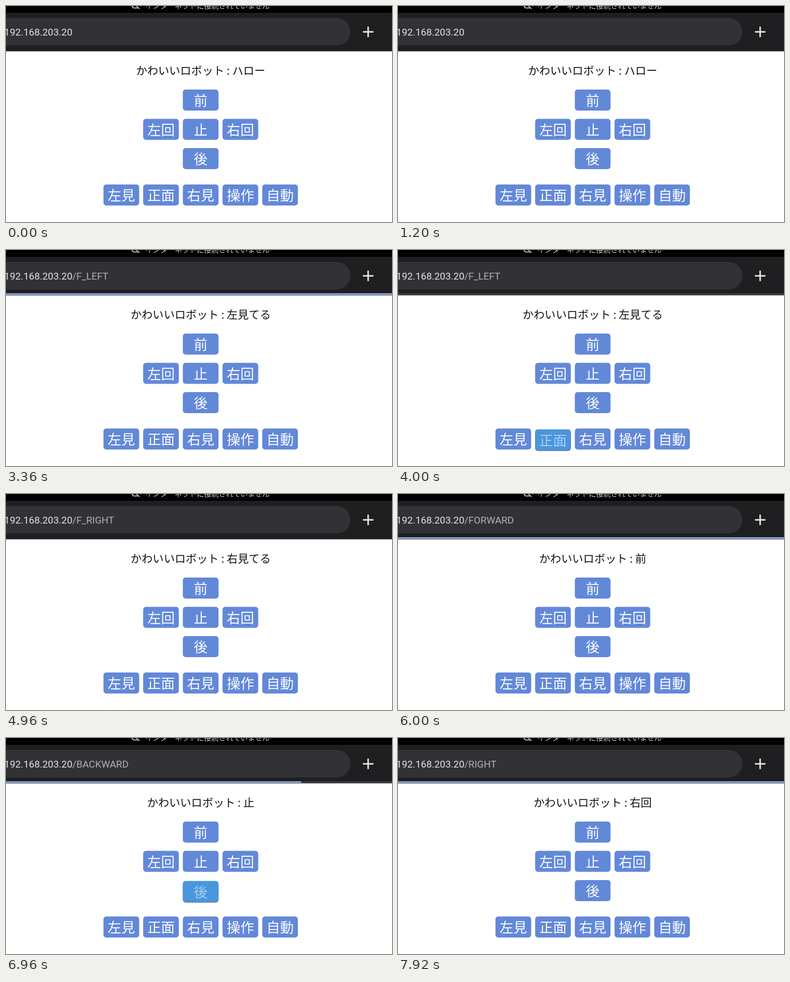
These frames come from a looping animation (676x380 px, 8 s). An HTML page:

```html
<!DOCTYPE html>
<html lang="ja">
<head>
<meta charset="utf-8">
<style>
html, body { margin: 0; width: 100%; height: 100%; overflow: hidden; background: #fff; }
svg { display: block; }
text { font-family: "Noto Sans CJK JP", "Noto Sans CJK", sans-serif; }
.url { font: 17.1px Roboto, sans-serif; }
.button rect { fill: #6288d8; }
.button text { font-size: 24px; fill: #fff; text-anchor: middle; }
.button .edge { fill: none; }
.pressed { transform: translateY(1.4px); }
.pressed .face { fill: #4a96dc; }
.pressed .edge { fill: #5a5f92; }
.pressed text { fill: #a8d0f2; }
</style>
</head>
<body>
<svg width="676" height="380" viewBox="0 0 676 380">
  <rect width="676" height="79.7" fill="#1f1f21"/>
  <rect width="676" height="12" fill="#000"/>
  <path d="M223 -4a4 4 0 0 0 1 7.5h7M221 -6l13 11" fill="none" stroke="#ccc" stroke-width="1.5"/>
  <text x="244" y="4.2" font-size="12.85" fill="#ccc">インターネットに接続されていません</text>
  <rect x="-60" y="21" width="663" height="48.5" rx="24" fill="#323236"/>
  <text class="url" x="116.3" y="52" text-anchor="end" fill="#e6e6e8">192.168.203.20</text>
  <text class="url" id="path" x="116.3" y="52" fill="#b2b2b6"></text>
  <path d="M625 45.5h18.5M634.2 36.2v18.5" stroke="#eee" stroke-width="2.5"/>
  <rect id="track" y="76.3" width="676" height="2.6" fill="#3d3e43"/>
  <rect id="bar" y="76.3" height="2.4" fill="#9ab8f2"/>
  <text id="title" x="341" y="120.5" font-size="19.3" fill="#111" text-anchor="middle"></text>
  <g id="pad"></g>
</svg>
<script>
const LOOP = 8000, STEP = 80;
const $ = id => document.getElementById(id);

// label, column, top
const layout = [
  ['前', 2, 147], ['左回', 1, 198.5], ['止', 2, 198.5], ['右回', 3, 198.5], ['後', 2, 250],
  ['左見', 0, 314], ['正面', 1, 314], ['右見', 2, 314], ['操作', 3, 314], ['自動', 4, 314]
];

// press time, button, path, resulting state
const presses = [
  [2400, '操作', '/MANUAL', '操作'],
  [3120, '左見', '/F_LEFT', '左見てる'],
  [4000, '正面', '/F_FRONT', '正面見てる'],
  [4560, '右見', '/F_RIGHT', '右見てる'],
  [5200, '正面', '/F_FRONT', '正面見てる'],
  [5760, '前', '/FORWARD', '前'],
  [6320, '止', '/STOP', '止'],
  [6880, '後', '/BACKWARD', '後'],
  [7280, '止', '/STOP', '止'],
  [7680, '右回', '/RIGHT', '右回']
];
const idle = [-LOOP, '', '', 'ハロー'];

$('pad').innerHTML = layout.map(([label, col, y]) => {
  const x = 170.7 + col * 69.5;
  return `<g class="button" data-label="${label}">
    <rect class="edge" x="${x}" y="${y + 1}" width="62.5" height="37" rx="5"/>
    <rect class="face" x="${x}" y="${y}" width="62.5" height="37" rx="5"/>
    <text x="${x + 31.25}" y="${y + 28.3}">${label}</text></g>`;
}).join('');
const buttons = document.querySelectorAll('.button');

function render(time) {
  const t = Math.floor(time % LOOP / STEP) * STEP;
  const past = [idle, idle, ...presses.filter(p => p[0] <= t)];
  const [previous, current] = past.slice(-2);
  const age = t - current[0];
  const loading = age < 320;

  $('path').textContent = (age < 80 ? previous : current)[2];
  $('title').textContent = 'かわいいロボット : ' + (age < 160 ? previous : current)[3];
  $('track').setAttribute('visibility', loading ? 'visible' : 'hidden');
  $('bar').setAttribute('width', !loading || age < 80 ? 0 : age < 160 ? 517 : 676);
  for (const b of buttons)
    b.classList.toggle('pressed', age < 160 && b.dataset.label === current[1]);
}

function tick() {
  render(performance.now());
  requestAnimationFrame(tick);
}
tick();
</script>
</body>
</html>
```
